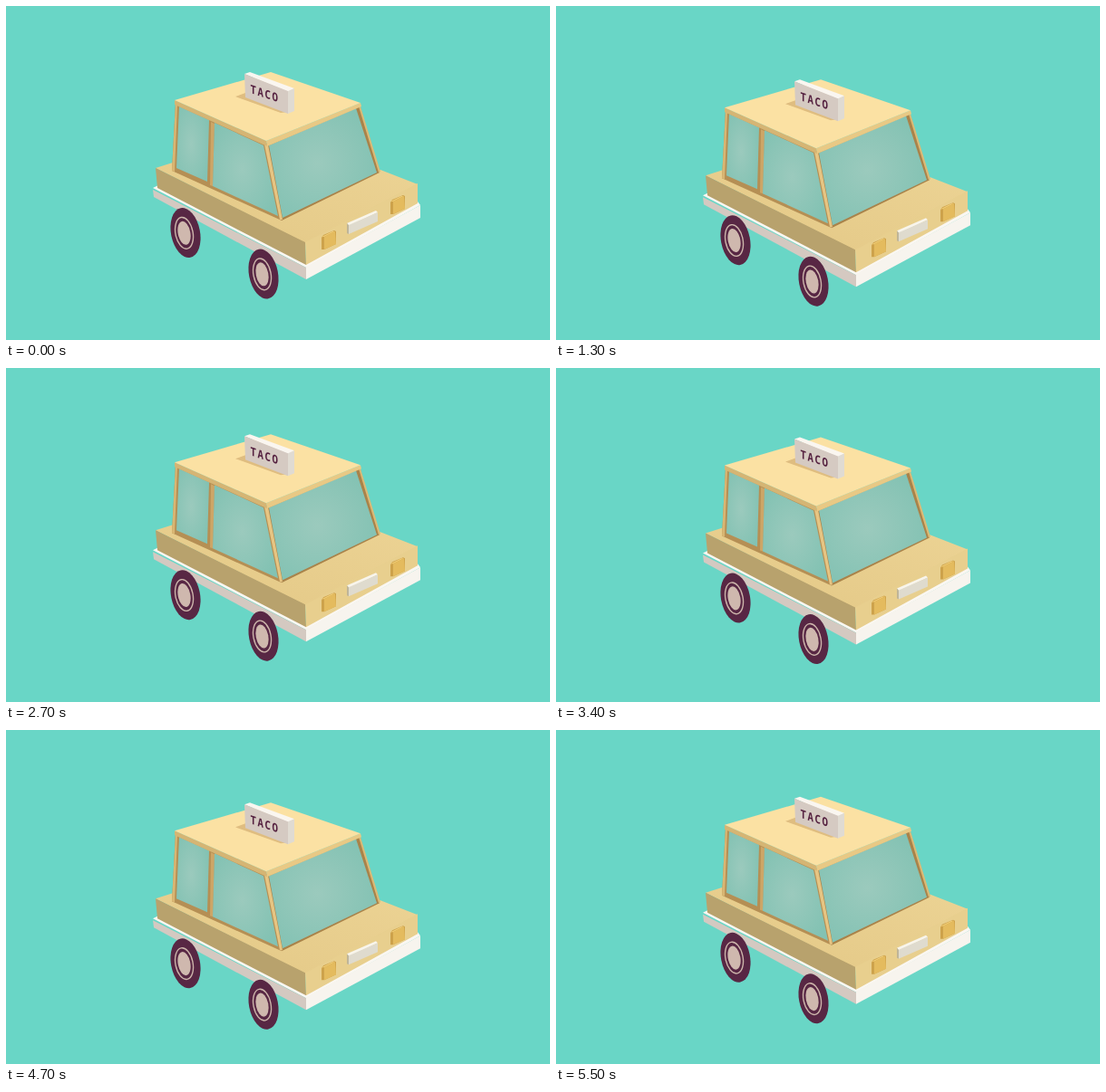
Write an HTML page that moves like this. It is 600 px wide and 369 px high and loops after 5600 ms.

```html
<!DOCTYPE html>
<html lang="en">
<head>
<meta charset="utf-8">
<title>Bobbing taco cab</title>
<style>
  html, body { margin: 0; width: 100%; height: 100%; overflow: hidden; background: #69d6c6; }
  svg { display: block; width: 100vw; height: 100vh; }
  text { font: bold 13px "Noto Sans Mono", monospace; letter-spacing: 2px; fill: #54203f; }
</style>
</head>
<body>
<svg viewBox="0 0 600 369">
  <defs>
    <radialGradient id="glass" cx=".45" cy=".5" r=".6">
      <stop offset="0" stop-color="#9bcabd"/>
      <stop offset="1" stop-color="#83c2b3"/>
    </radialGradient>
    <linearGradient id="hood" x1="0" y1="1" x2="1" y2="0">
      <stop offset="0" stop-color="#e3c886"/>
      <stop offset="1" stop-color="#ecd394"/>
    </linearGradient>
    <g id="wheel" transform="rotate(-11)">
      <ellipse rx="16" ry="27.8" fill="#582744"/>
      <ellipse cx="-1.5" rx="9.6" ry="17.6" fill="none" stroke="#cdb5ab" stroke-width="1.4"/>
      <ellipse cx="-1.5" rx="6.8" ry="13.2" fill="#cfb8ae"/>
    </g>
    <g id="lamp">
      <path d="M0 3 2 0 14 -5 16 -4 16 10 3 16 0 16Z" fill="#cda24b"/>
      <path d="M0 2 12 -4 15 -4 3 2Z" fill="#efca74"/>
      <path d="M3 2 15 -4 16 10 3 16Z" fill="#e4bb5e"/>
    </g>
  </defs>

  <g id="car">
    <!-- bumper and body -->
    <path d="M162 201 168 198 331 284 454 216 457 220 331 289Z" fill="#faf7f2"/>
    <path d="M162 203 331 289 331 302 163 211Z" fill="#d4c9c1"/>
    <path d="M331 288 457 220 457 234 331 302Z" fill="#f7f4ee"/>
    <path d="M165 179 187 172 413 181 454 197 330 262Z" fill="url(#hood)"/>
    <path d="M165 179 330 261 331 286 167 201Z" fill="#b8a26d"/>
    <path d="M330 261 454 196 454 218 331 286Z" fill="#e8cf8e"/>

    <!-- cabin -->
    <path d="M187 106 288 152 304 237 183 182Z" fill="#b58f54"/>
    <path d="M187 108 189 109 186 183 183 182Z" fill="#d9b673"/>
    <path d="M191 111 224 126 222 194 188 179Z" fill="url(#glass)"/>
    <path d="M226 128 230 130 228 199 225 198Z" fill="#cda667"/>
    <path d="M230 129 284 154 300 232 228 199Z" fill="url(#glass)"/>
    <path d="M288 152 390 109 412 184 304 237Z" fill="#a9834a"/>
    <path d="M290 154 386 113 409 184 305 234Z" fill="url(#glass)"/>
    <path d="M285 153 289 153 305 236 302 236Z" fill="#e6c583"/>
    <path d="M389 111 391 111 413 183 411 184Z" fill="#dcba76"/>

    <!-- roof -->
    <path d="M186 104 287 149 288 155 186 109Z" fill="#d5b574"/>
    <path d="M287 149 391 107 392 111 288 155Z" fill="#e8c985"/>
    <path d="M186 104 292 73 391 107 287 149Z" fill="#fbe1a3"/>

    <!-- sign -->
    <path d="M253 100 264 96 312 117 303 118Z" fill="#dfbd80"/>
    <path d="M263 75 269 73 318 91 311 95Z" fill="#faf6f0"/>
    <path d="M263 75 311 94 311 119 264 101Z" fill="#d5cac2"/>
    <path d="M311 94 318 91 318 116 311 119Z" fill="#e0dbd2"/>
    <text transform="matrix(.82 .27 0 1 269.5 96)">TACO</text>

    <!-- front details -->
    <use href="#lamp" x="348" y="253"/>
    <use href="#lamp" x="424" y="214"/>
    <path d="M376 240 408 226 410 228 378 243Z" fill="#f8f5ec"/>
    <path d="M376 240 378 242 378 252 376 251Z" fill="#bfb598"/>
    <path d="M378 242 410 228 410 238 378 252Z" fill="#dfdbce"/>

    <use href="#wheel" x="198" y="250.5"/>
    <use href="#wheel" x="284" y="296"/>
  </g>
</svg>
<script>
  const STEP = 100, STEPS = 56;
  const MIDDLE = 2, SWING = 6.3;
  const car = document.getElementById("car");

  // The car bobs on a cosine of uneven pace: [step, cycles completed]
  const pace = [
    [0, .3], [7, .9], [12, 1.9], [19, 2.79], [27, 3.705],
    [34, 4.21], [42, 4.87], [47, 5.91], [55, 7.28], [56, 7.3]
  ];

  function cyclesAt(step) {
    const next = pace.findIndex(([at]) => at > step);
    const [t0, c0] = pace[next - 1], [t1, c1] = pace[next];
    return c0 + (c1 - c0) * (step - t0) / (t1 - t0);
  }

  function draw() {
    const step = Math.floor(performance.now() / STEP) % STEPS;
    const y = MIDDLE + SWING * Math.cos(2 * Math.PI * cyclesAt(step));
    car.setAttribute("transform", `translate(0 ${y.toFixed(2)})`);
    requestAnimationFrame(draw);
  }
  draw();
</script>
</body>
</html>
```
